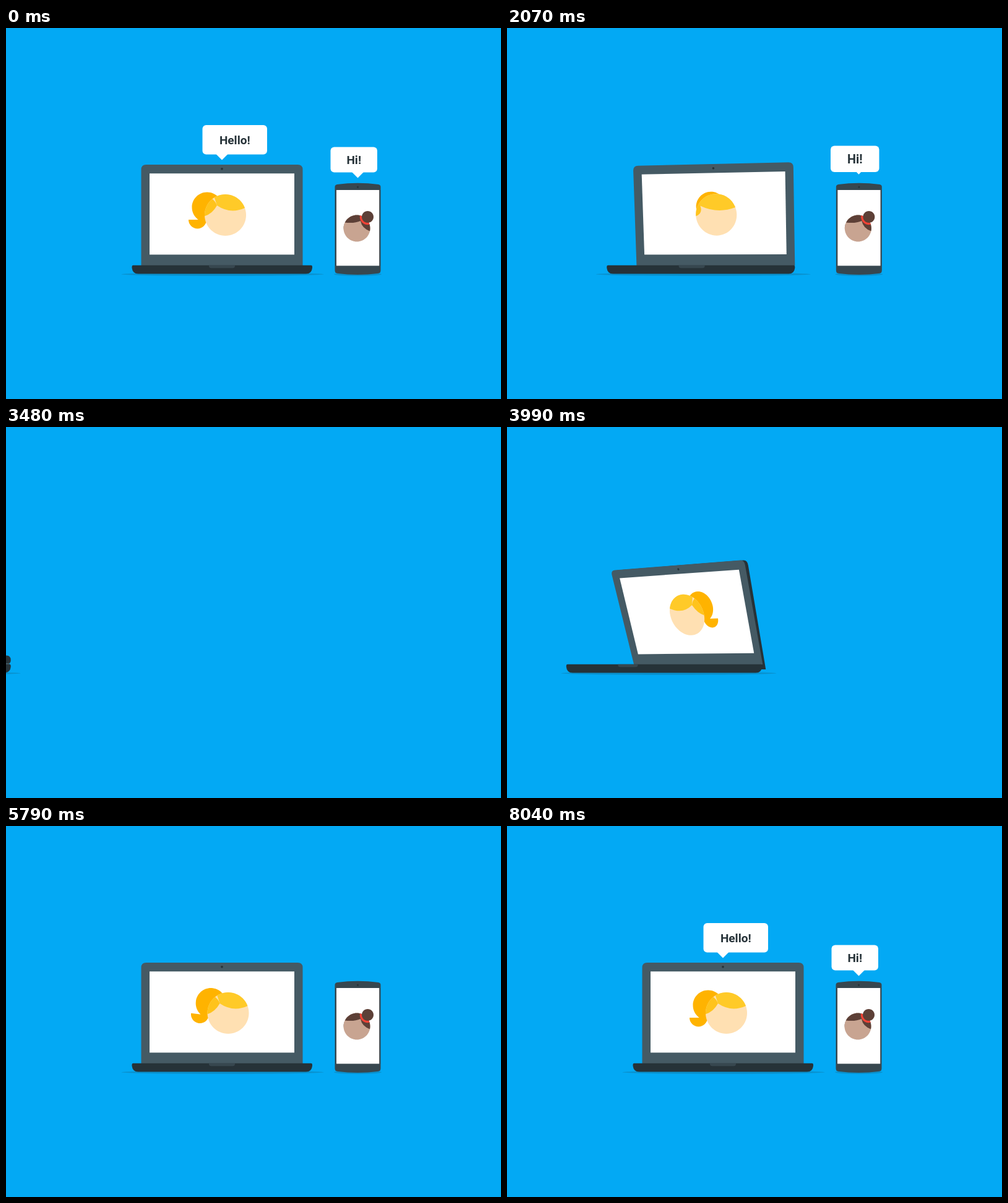
These frames come from a looping animation (800x600 px, 8070 ms). An HTML page:

```html
<!DOCTYPE html>
<html lang="en">
<head>
<meta charset="utf-8">
<title>Video call</title>
<style>
html, body { margin: 0; width: 100%; height: 100%; overflow: hidden; background: #03a9f4; }
svg { display: block; width: 100%; height: 100%; }
text { font: 700 19px Roboto, Arial, sans-serif; fill: #263238; text-anchor: middle; }
</style>
</head>
<body>
<script>
const LOOP = 8070;
const NS = 'http://www.w3.org/2000/svg';
const INK = '#263238';

function add(parent, name, attrs = {}) {
  const node = document.createElementNS(NS, name);
  set(node, attrs);
  return parent.appendChild(node);
}
function set(node, attrs) {
  for (const key in attrs) node.setAttribute(key, attrs[key]);
}
const clamp = (v, lo = 0, hi = 1) => Math.min(hi, Math.max(lo, v));
const lerp = (a, b, k) => a + (b - a) * k;

// Smooth curve through [time, value] keys that never overshoots them.
function track(t, keys) {
  const last = keys.length - 1;
  if (t <= keys[0][0]) return keys[0][1];
  if (t >= keys[last][0]) return keys[last][1];
  let i = 0;
  while (t > keys[i + 1][0]) i++;
  const slope = j => (keys[j + 1][1] - keys[j][1]) / (keys[j + 1][0] - keys[j][0]);
  const tangent = j => {
    if (j === 0 || j === last) return 0;
    const a = slope(j - 1), b = slope(j);
    return a * b <= 0 ? 0 : 2 * a * b / (a + b);
  };
  const [t0, v0] = keys[i], [t1, v1] = keys[i + 1];
  const d = t1 - t0, k = (t - t0) / d, q = 1 - k;
  return v0 * (1 + 2 * k) * q * q + v1 * k * k * (3 - 2 * k)
    + d * k * q * (tangent(i) * q - tangent(i + 1) * k);
}

// Path builders; coordinates are always "x y" pairs so that warp() can move them.
const n = v => v.toFixed(2);
const pt = (x, y) => n(x) + ' ' + n(y);
function circle(x, y, r) {
  const c = r * 0.5523;
  return `M${pt(x - r, y)}C${pt(x - r, y - c)} ${pt(x - c, y - r)} ${pt(x, y - r)}` +
    `C${pt(x + c, y - r)} ${pt(x + r, y - c)} ${pt(x + r, y)}` +
    `C${pt(x + r, y + c)} ${pt(x + c, y + r)} ${pt(x, y + r)}` +
    `C${pt(x - c, y + r)} ${pt(x - r, y + c)} ${pt(x - r, y)}Z`;
}
function halfDisc(x, y, r) {
  const c = r * 0.5523;
  return `M${pt(x - r, y)}L${pt(x + r, y)}C${pt(x + r, y + c)} ${pt(x + c, y + r)} ${pt(x, y + r)}` +
    `C${pt(x - c, y + r)} ${pt(x - r, y + c)} ${pt(x - r, y)}Z`;
}
function box(x0, y0, x1, y1, r = 0) {
  return `M${pt(x0, y1)}L${pt(x0, y0 + r)}Q${pt(x0, y0)} ${pt(x0 + r, y0)}` +
    `L${pt(x1 - r, y0)}Q${pt(x1, y0)} ${pt(x1, y0 + r)}L${pt(x1, y1)}Z`;
}
const warp = (d, f) =>
  d.replace(/(-?[\d.]+) (-?[\d.]+)/g, (_, x, y) => pt(...f(+x, +y)));

// Bilinear map of a rectangle onto four corners (tl, tr, br, bl).
function quad(x0, y0, w, h, tl, tr, br, bl) {
  return (x, y) => {
    const u = (x - x0) / w, v = (y - y0) / h;
    return [0, 1].map(i => lerp(lerp(tl[i], tr[i], u), lerp(bl[i], br[i], u), v));
  };
}

const svg = add(document.body, 'svg', { viewBox: '0 0 800 600' });
const defs = add(svg, 'defs');
add(svg, 'rect', { width: 800, height: 600, fill: '#03a9f4' });

const shape = (parent, fill, extra) => add(parent, 'path', { fill, ...extra });
const shadow = () => add(svg, 'ellipse', { fill: INK, opacity: 0.2, cy: 398.3, ry: 2.7 });
function clip(id) {
  return add(add(defs, 'clipPath', { id }), 'path');
}

const laptop = { shadow: shadow() };
laptop.back = shape(svg, INK);
laptop.lid = shape(svg, '#455a64');
laptop.view = add(svg, 'g');
laptop.camera = shape(laptop.view, INK);
laptop.screen = shape(laptop.view, '#fff');
laptop.pony = shape(laptop.view, '#ffb300');
laptop.face = shape(laptop.view, '#ffe0b2');
laptop.clip = clip('blonde');
const blonde = add(laptop.view, 'g', { 'clip-path': 'url(#blonde)' });
laptop.cap = shape(blonde, '#ffca28');
laptop.lobes = shape(blonde, '#ffc31c');
laptop.slab = shape(svg, INK);
laptop.base = shape(svg, INK);
laptop.notch = shape(svg, '#37474f');

const phone = { shadow: shadow() };
phone.body = shape(svg, '#37474f');
phone.screen = shape(svg, '#fff');
phone.camera = shape(svg, INK);
phone.face = shape(svg, '#c8a491');
phone.clip = clip('brown');
const brown = add(svg, 'g', { 'clip-path': 'url(#brown)' });
phone.cap = shape(brown, '#5d4037');
phone.band = shape(brown, '#f44336');
phone.bun = shape(svg, '#5d4037');

function bubble(x, y, w, h, tailX, word, baseline) {
  const group = add(svg, 'g');
  const tail = shape(group, '#fff', { d: 'M-10 -1H10L0 9Z' });
  const body = add(group, 'g');
  add(body, 'rect', { x, y, width: w, height: h, rx: 6, fill: '#fff' });
  add(body, 'text', { x: x + w / 2, y: baseline }).textContent = word;
  const cx = x + w / 2, cy = y + h / 2;
  return (size, tailSize, rise) => {
    set(group, { transform: `translate(0 ${n(rise)})`, visibility: size > 0.01 ? 'visible' : 'hidden' });
    set(body, { transform: `translate(${cx} ${cy}) scale(${n(size)}) translate(${-cx} ${-cy})` });
    set(tail, { transform: `translate(${tailX} ${y + h}) scale(${n(tailSize)})` });
  };
}
const hello = bubble(317.5, 157, 104.5, 47.5, 349, 'Hello!', 188.3);
const hi = bubble(524.5, 192.5, 75.5, 41, 568.5, 'Hi!', 220.3);

function showBubble(draw, t, leave, enter, lift) {
  if (t < enter) {
    const s = t - leave;
    draw(track(s, [[0, 1], [80, 1.04], [130, 1.05], [230, 0]]),
      track(s, [[0, 1], [80, 0.5], [150, 0]]),
      track(s, [[70, 0], [115, -8]]));
  } else {
    const s = t - enter;
    draw(track(s, [[0, 0], [200, 1.025], [380, 1]]),
      track(s, [[150, 0], [360, 1]]),
      track(s, [[0, 8], [200, lift], [380, 0]]));
  }
}

// Laptop poses, x relative to the shadow centre.
const POSES = [
  { l: -146.5, r: 145, bl: -131.5, br: 129.5, tl: -131.5, tr: 129.5, tly: 221, try: 221, low: 384, notch: -1, half: 21, thick: 0, sh: 163.5 },
  { l: -156, r: 148, bl: -108, br: 148, tl: -113.5, tr: 145.5, tly: 223, try: 217, low: 384, notch: -18.5, half: 21, thick: 0, sh: 173.5 },
  { l: -165.5, r: 151, bl: -56, br: 152, tl: -93.5, tr: 122, tly: 232, try: 215, low: 384, notch: -66, half: 16, thick: 5, sh: 174 },
  { l: -165, r: 158, bl: -163, br: 156, tl: -163, tr: 156, tly: 371, try: 371, low: 384, notch: -66, half: 16, thick: 0, sh: 174 }
];
function poseAt(p) {
  const i = Math.min(2, Math.floor(p)), out = {};
  for (const key in POSES[i]) out[key] = lerp(POSES[i][key], POSES[i + 1][key], p - i);
  return out;
}

function drawBlonde(f, h, sway) {
  const x = 354.5 - 3.5 * (1 - h) + sway, y = 302.5;
  const a = sway / 4.5 * 0.12, cos = Math.cos(a), sin = Math.sin(a);
  const at = (px, py) => f(x + px, y + py);
  const swing = (px, py) => at(px * cos - py * sin, px * sin + py * cos);
  const face = warp(circle(0, 0, 33.5), at);
  const left = -31 + 17.5 * h, right = 31 + 17.5 * h;
  const ly = -11.5 - 4 * clamp(h * 3), ry = -11.5 - 4 * clamp(-h * 3);
  const l = Math.max(left, -31.5), r = Math.min(right, 31.5);
  const cap = `M${pt(l, ly)}Q${pt((l + r) / 2 - h, -1)} ${pt(r, ry)}L${pt(r + 8, -40)}L${pt(l - 8, -40)}Z`;
  const lobe = (p, s) => `M${pt(s * 34, 2)}Q${pt(s * 21, -2)} ${pt(p, -15.5)}` +
    `Q${pt(p + s * 3, -24)} ${pt(p + s * 10, -27)}L${pt(s * 44, -30)}Z`;
  const lobes = (h > 0 ? lobe(left, -1) : '') + (h < 0 ? lobe(right, 1) : '');

  set(laptop.pony, { d: warp(circle(-29.5 * h, -12.5, 24.5) + halfDisc(-45 * h, 7.5, 14.5), swing) });
  set(laptop.face, { d: face });
  set(laptop.clip, { d: face });
  set(laptop.cap, { d: warp(cap, at) });
  set(laptop.lobes, { d: warp(lobes, at) });
}

function drawLaptop(t) {
  const cx = track(t, [[1700, 350], [1950, 336], [2070, 317.5], [2400, 190], [2700, 36],
    [3060, -225], [3400, -190], [3450, -173], [3700, 121], [3990, 261], [4230, 309], [4560, 349.5], [4700, 350]]);
  const p = track(t, [[1700, 0], [2070, 1], [2380, 2], [2620, 3], [3500, 3], [3990, 2], [4230, 1], [4540, 0]]);
  const s = poseAt(p);
  const shut = clamp((p - 2.6) / 0.4);
  const f = quad(218.5, 221, 261, 163,
    [cx + s.tl, s.tly], [cx + s.tr, s.try], [cx + s.br, s.low], [cx + s.bl, s.low]);
  const lid = box(218.5, 221, 479.5, 384, 8);
  const l = cx + s.l, r = cx + s.r, m = cx + s.notch;

  set(laptop.shadow, { cx: n(cx), rx: n(s.sh) });
  set(laptop.lid, { d: warp(lid, f) });
  set(laptop.back, {
    d: warp(lid, (x, y) => {
      const q = f(x, y);
      return [q[0] + s.thick, q[1] + s.thick * 1.6 * (y - 221) / 163];
    }),
    opacity: s.thick > 0.1 ? 1 : 0
  });
  set(laptop.view, { opacity: 1 - shut });
  set(laptop.camera, { d: warp(circle(349, 227.7, 1.8), f) });
  set(laptop.screen, { d: warp(box(232, 235.3, 466, 366.4), f) });

  const h = track(t, [[1750, 1], [2070, 0.28], [2450, -1], [4020, -1], [4560, 0.65], [4900, 1]]);
  const sway = track(t, [[5470, 0], [5790, 4.5], [6130, -2], [6480, 1.5], [6850, -1], [7250, 0]]);
  drawBlonde(f, h, sway);

  set(laptop.slab, {
    d: `M${n(l + 7)} 369.5H${n(r - 7)}Q${n(r)} 369.5 ${n(r)} 377Q${n(r)} 382 ${n(r - 3)} 382H${n(l + 3)}` +
      `Q${n(l)} 382 ${n(l)} 377Q${n(l)} 369.5 ${n(l + 7)} 369.5Z`,
    opacity: shut
  });
  set(laptop.base, {
    d: `M${n(l + 2)} 383.7H${n(r - 2)}Q${n(r)} 383.7 ${n(r)} 386V388Q${n(r - 1)} 397.5 ${n(r - 10)} 397.5` +
      `H${n(l + 10)}Q${n(l + 1)} 397.5 ${n(l)} 388V386Q${n(l)} 383.7 ${n(l + 2)} 383.7Z`
  });
  set(laptop.notch, {
    d: `M${n(m - s.half)} 383.7H${n(m + s.half)}V385Q${n(m + s.half)} 388.2 ${n(m + s.half - 4)} 388.2` +
      `H${n(m - s.half + 4)}Q${n(m - s.half)} 388.2 ${n(m - s.half)} 385Z`,
    opacity: 1 - shut
  });
}

function drawBrown(f, h, x) {
  const at = (px, py) => f(x + px, 324 + py);
  const face = warp(circle(0, 0, 21.5), at);
  const l = -13 + 7 * h, r = 13 + 7 * h;
  const ly = -12 + 2.5 * clamp(-h), ry = -12 + 2.5 * clamp(h);
  const lobe = (p, py, s) => `L${pt(p, py)}Q${pt(p + s * 2, 0)} ${pt(s * 22, 5)}L${pt(s * 30, 4)}L${pt(s * 30, -30)}`;
  const cap = `M${pt(l, ly)}Q${pt((l + r) / 2 - 3 * h, -7.5)} ${pt(r, ry)}` + lobe(r, ry, 1) +
    `L${pt(-30, -30)}L${pt(-30, 4)}L${pt(-22, 5)}Q${pt(l - 2, 0)} ${pt(l, ly)}Z`;
  const bx = -17.5 * h, by = -18.5;

  set(phone.face, { d: face });
  set(phone.clip, { d: face });
  set(phone.cap, { d: warp(cap, at) });
  set(phone.band, { d: warp(circle(bx, by, 9.5 + 3.2 * clamp(Math.abs(h) * 2 - 1)), at) });
  set(phone.bun, { d: warp(circle(bx, by, 9.5), at) });
}

function drawPhone(t) {
  const cx = t < 3400
    ? 568.5 + (t < 1950 ? 0 : 24 * Math.exp((t - 2700) / 150))
    : 568.5 + (t > 5040 ? 0 : 141 * Math.exp((4230 - t) / 120));
  const k = track(t, [[2150, 0], [2700, 1], [3200, 1], [4100, 0.7], [4500, 0]]);
  const w = 37 - 2.4 * k;
  const f = quad(531.5, 251, 74, 148,
    [cx - w, 251 - k * 0.5], [cx + w, 251 + k * 1.5], [cx + w, 399], [cx - w, 399]);
  const body = 'M531.5 257Q531.5 253.5 535 253Q568.5 248.3 602 253Q605.5 253.5 605.5 257' +
    'L605.5 392Q605.5 396 602 396.7Q568.5 401.5 535 396.7Q531.5 396 531.5 392Z';

  set(phone.shadow, { cx: n(cx), rx: n(w + 1.5) });
  set(phone.body, { d: warp(body, f) });
  set(phone.screen, { d: warp(box(534 + 2 * k, 262, 603.2, 384.6), f) });
  set(phone.camera, { d: warp(circle(568.5, 257.3, 1.5), f) });

  const h = track(t, [[2080, -1], [2400, -0.5], [2700, 0.5], [2950, 1], [4400, 1], [4560, 0.91],
    [5040, 0.65], [5280, -1]]);
  const sway = track(t, [[7090, 0], [7330, -2], [7580, 1], [7880, 0]]);
  drawBrown(f, h, 567 + 1.5 * k + sway);
}

function draw(t) {
  drawLaptop(t);
  drawPhone(t);
  showBubble(hello, t, 1830, 5850, -5);
  showBubble(hi, t, 1990, 7250, -2);
}

function tick() {
  draw(performance.now() % LOOP);
  requestAnimationFrame(tick);
}
tick();
</script>
</body>
</html>
```
